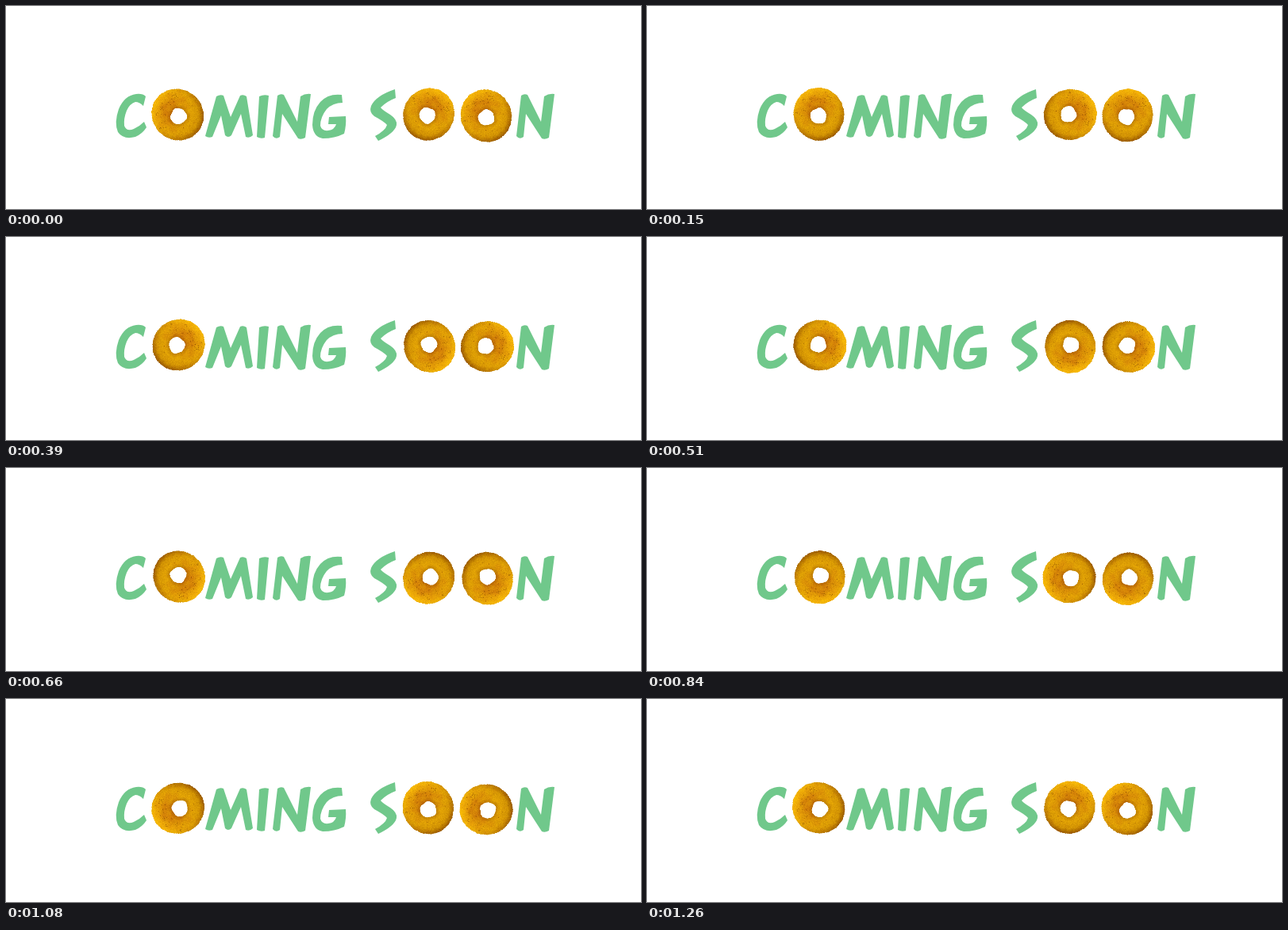
An HTML page with a canvas for the animation above (1290 ms loop, 800x256 px).

```html
<!DOCTYPE html>
<html lang="en">
<meta charset="utf-8">
<title>Coming soon</title>
<style>
  html, body { margin: 0; width: 100%; height: 100%; overflow: hidden; background: #fff; }
  canvas { display: block; }
</style>
<canvas id="stage" width="800" height="256" role="img" aria-label="Coming soon"></canvas>
<script>
const ctx = document.getElementById('stage').getContext('2d');
const STEP = 30, STEPS = 43, SIZE = 76, DENSITY = 2;

const N = 'M336 164L342 113Q346 110 350 112L367 146L371 114Q377 110 384 111L377 166Q372 169 368 167L348 136L345 165Q340 169 336 164Z';
const letters = {
  C: 'M164 111Q172 110 176 114L173 126Q168 121 163 121Q156 123 152 132Q148 142 149 151Q152 159 161 155Q168 152 174 146L177 153Q172 161 163 165Q148 169 141 159Q136 147 142 130Q149 113 164 111Z',
  M: 'M251 164L265 114Q270 111 274 113L283 140L295 113Q299 111 303 114L311 163Q307 167 302 165L296 136L284 163Q280 167 276 163L271 138L260 165Q255 167 251 164Z',
  I: 'M319 114Q325 111 331 113L326 166Q321 168 316 165Z',
  N,
  G: 'M423 112L424 122Q412 122 404 130Q396 140 396 151Q398 158 406 157Q414 156 416 149L406 149L407 140L428 139Q429 150 426 161Q414 167 399 167Q387 165 386 150Q386 132 396 121Q406 110 423 112Z',
  S: 'M490 105L491 116Q480 120 472 128Q474 131 484 137Q493 143 492 150Q490 160 469 170L465 164Q478 157 480 150Q477 146 464 139Q457 134 460 126Q466 113 490 105Z'
};
const wording = new Path2D(Object.values(letters).join(''));
wording.addPath(new Path2D(N), new DOMMatrix([1, 0, 0, 1, 307, 0]));

// Pivot and starting angle of each ring
const rings = [[217.2, 137, 0], [532.7, 137.6, 85], [605.8, 138.8, 25]];

let seed = 7;
const random = () => (seed = seed * 16807 % 2147483647) / 2147483647;
const clamp = v => Math.max(0, Math.min(1, v));
const LIT = 205 * Math.PI / 180;

function makeRing() {
  const sprite = document.createElement('canvas');
  const side = sprite.width = sprite.height = SIZE * DENSITY;
  const g = sprite.getContext('2d');
  const image = g.createImageData(side, side);
  const tilt = 38 * Math.PI / 180, cos = Math.cos(tilt), sin = Math.sin(tilt);
  for (let i = 0; i < side * side; i++) {
    const x = (i % side + .5) / DENSITY - SIZE / 2;
    const y = (Math.floor(i / side) + .5) / DENSITY - SIZE / 2;
    const u = (x + 1) * cos + y * sin, v = y * cos - (x + 1) * sin;
    const angle = Math.atan2(y, x);
    const rim = Math.hypot(u / 33.4, v / 31.8) + .006 * Math.sin(17 * angle);
    const hole = Math.hypot(x - .2, y - 2) / (10.1 + .4 * Math.sin(3 * angle + 1) + .3 * Math.sin(5 * angle));
    const grain = random() - .5;
    if (rim + grain * .02 > 1 || hole < 1) continue;
    const facing = Math.cos(angle - LIT);
    const blotch = Math.sin(x * .31 + y * .17) * Math.sin(y * .37 - x * .12);
    const outer = clamp((rim - .55) / .4);
    const toast = clamp((.35 + facing * .5) * (1 - outer) + blotch * .2);
    const shade = 45 * clamp((rim - .8) / .2) * (.5 - facing * .5) + 30 * clamp((1.5 - hole) / .5);
    const light = grain * 28 - shade + facing * outer * 22;
    image.data.set([224 - toast * 14 + light, 161 - toast * 34 + light, 5 + toast * 3 + light * .1, 255], i * 4);
  }
  g.putImageData(image, 0, 0);
  g.scale(DENSITY, DENSITY);
  g.translate(SIZE / 2, SIZE / 2);
  for (let i = 0; i < 48; i++) {
    const angle = LIT + (random() - .5) * (i < 34 ? 2.4 : 6.28), radius = 16 + random() * 14;
    g.fillStyle = `rgba(110,50,0,${.3 + random() * .4})`;
    g.fillRect(radius * Math.cos(angle), radius * Math.sin(angle), 1, 1);
  }
  return sprite;
}
const ring = makeRing();

function draw(now) {
  const turn = Math.floor(now / STEP) % STEPS / STEPS * 2 * Math.PI;
  ctx.fillStyle = '#fff';
  ctx.fillRect(0, 0, 800, 256);
  ctx.fillStyle = '#70c88b';
  ctx.fill(wording);
  for (const [x, y, start] of rings) {
    ctx.save();
    ctx.translate(x, y);
    ctx.rotate(turn + start * Math.PI / 180);
    ctx.drawImage(ring, -SIZE / 2, -SIZE / 2, SIZE, SIZE);
    ctx.restore();
  }
}

const begin = performance.now();
function tick() {
  draw(performance.now() - begin);
  requestAnimationFrame(tick);
}
tick();
</script>
</html>
```
